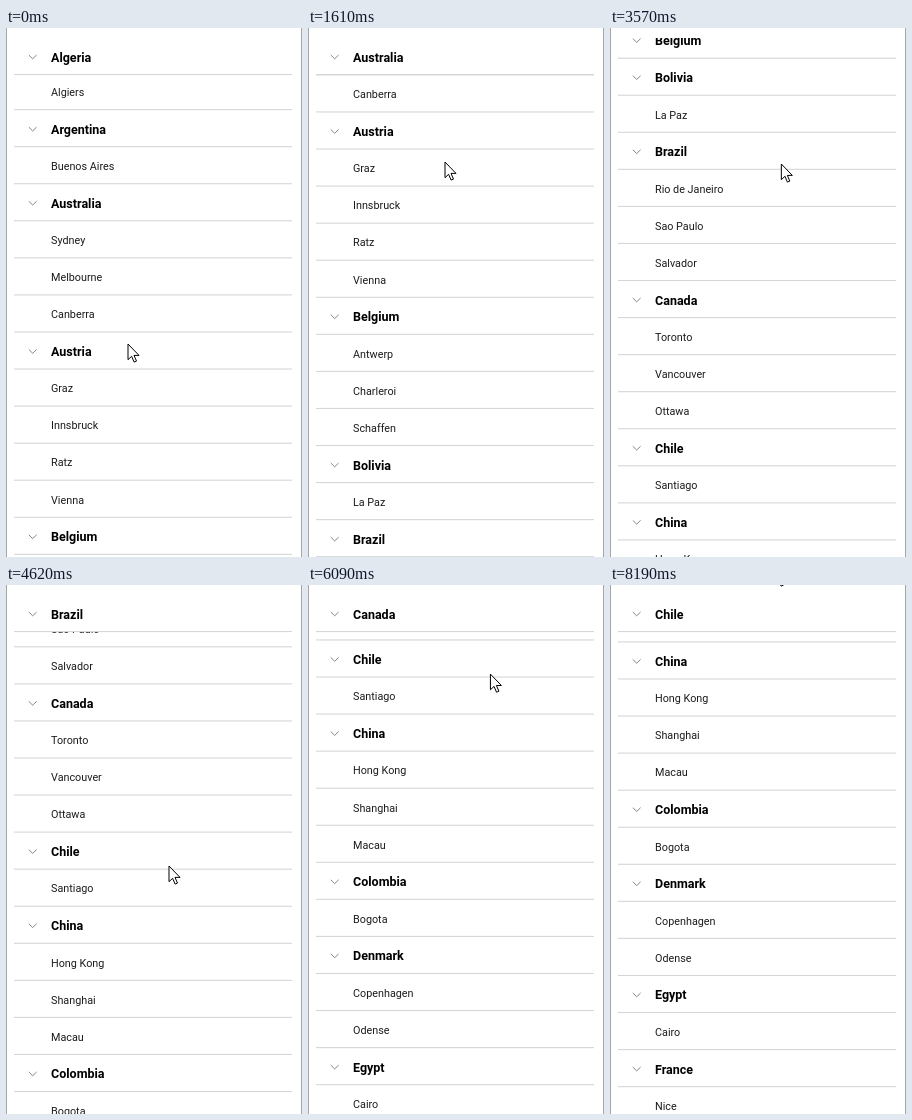
An HTML page with a canvas that plays this animation: 296x529 px, repeating every 8.68 s.

```html
<!DOCTYPE html>
<html lang="en">
<head>
<meta charset="utf-8">
<title>Grouped list</title>
<style>
html, body { margin: 0; width: 100%; height: 100%; overflow: hidden; background: #fff; }
canvas { display: block; width: 296px; height: 529px; }
</style>
</head>
<body>
<canvas id="stage"></canvas>
<script>
const W = 296, H = 529, LOOP = 8680, STEP = 70;
const ROW = 37.06, FIRST = 27, PINNED = 29, LIST_TOP = 10;

const groups = `Algeria:Algiers
Argentina:Buenos Aires
Australia:Sydney,Melbourne,Canberra
Austria:Graz,Innsbruck,Ratz,Vienna
Belgium:Antwerp,Charleroi,Schaffen
Bolivia:La Paz
Brazil:Rio de Janeiro,Sao Paulo,Salvador
Canada:Toronto,Vancouver,Ottawa
Chile:Santiago
China:Hong Kong,Shanghai,Macau
Colombia:Bogota
Denmark:Copenhagen,Odense
Egypt:Cairo
France:Nice`;

const rows = groups.split('\n').flatMap(line => {
  const [country, cities] = line.split(':');
  return [{ text: country, head: true }, ...cities.split(',').map(text => ({ text }))];
});

// time, scroll offset
const scrollKeys = [
  [0, 0], [350, 0], [420, 3], [1610, 220], [2380, 365.8], [2870, 365.8],
  [2940, 374], [3920, 737], [4130, 745], [4410, 745], [4480, 748],
  [4620, 761], [5390, 873], [6720, 1025.3]
];

// time, pointer x, pointer y
const pointerKeys = [
  [0, 122, 316], [280, 104, 373], [350, 104, 373], [1610, 137, 134],
  [2380, 160, 3], [2450, 160, 3], [2730, 171, 328], [2870, 170, 388],
  [3920, 172, 10], [4270, 167, 307], [4340, 169, 315], [4410, 169, 315],
  [4620, 163, 281], [5390, 174, 167], [6720, 190, 19], [6790, 190, 19],
  [7210, 147, 298], [7350, 147, 298], [7420, 147, 299], [7560, 147, 299],
  [7770, 145, 235], [8190, 165, -17]
];

function sample(keys, t, col) {
  const i = keys.findIndex(k => k[0] > t);
  if (i < 0) return keys[keys.length - 1][col];
  const a = keys[i - 1], b = keys[i];
  return a[col] + (b[col] - a[col]) * (t - a[0]) / (b[0] - a[0]);
}

const canvas = document.getElementById('stage');
const ctx = canvas.getContext('2d');
const dpr = window.devicePixelRatio || 1;
canvas.width = W * dpr;
canvas.height = H * dpr;

function drawRow(row, y) {
  ctx.fillStyle = '#d6d6d6';
  ctx.fillRect(8, y + 17, 278, 1.1);
  ctx.fillStyle = row.head ? '#000' : '#1c1c1c';
  ctx.font = row.head ? 'bold 12.5px Roboto, sans-serif' : '10.8px Roboto, sans-serif';
  ctx.fillText(row.text, 45, y + (row.head ? 4.5 : 3.8));
  if (!row.head) return;
  ctx.strokeStyle = '#777';
  ctx.lineWidth = 0.9;
  ctx.beginPath();
  ctx.moveTo(22.8, y - 2);
  ctx.lineTo(26.7, y + 1.8);
  ctx.lineTo(30.6, y - 2);
  ctx.stroke();
}

function drawList(scroll) {
  const center = i => FIRST + i * ROW - scroll;
  ctx.save();
  ctx.beginPath();
  ctx.rect(0, LIST_TOP, W, H);
  ctx.clip();

  let current = 0, next = -1;
  rows.forEach((row, i) => {
    const y = center(i);
    if (y > -ROW && y < H + ROW) drawRow(row, y);
    if (!row.head) return;
    if (y <= PINNED) current = i;
    else if (next < 0) next = i;
  });

  // the following header pushes the pinned one out
  const y = next < 0 ? PINNED : Math.min(PINNED, center(next) - ROW);
  ctx.fillStyle = '#fff';
  ctx.fillRect(1, y - 20, W - 2, 38);
  drawRow(rows[current], y);
  ctx.restore();
}

const arrow = new Path2D('M.5 .5V16.2L4.1 12.8L6.6 18.6L9 17.6L6.5 11.9H11.5Z');

function drawPointer(x, y) {
  ctx.save();
  ctx.translate(x - 0.5, y - 0.5);
  ctx.fillStyle = '#fff';
  ctx.strokeStyle = '#000';
  ctx.lineWidth = 1;
  ctx.fill(arrow);
  ctx.stroke(arrow);
  ctx.restore();
}

function draw(now) {
  const t = Math.floor((now % LOOP) / STEP) * STEP;
  ctx.setTransform(dpr, 0, 0, dpr, 0, 0);
  ctx.fillStyle = '#fff';
  ctx.fillRect(0, 0, W, H);
  drawList(sample(scrollKeys, t, 1));
  ctx.fillStyle = '#a6a6a6';
  ctx.fillRect(0, 0, 1, H);
  ctx.fillRect(W - 1, 0, 1, H);
  drawPointer(sample(pointerKeys, t, 1), sample(pointerKeys, t, 2));
}

const start = performance.now();
function tick() {
  draw(performance.now() - start);
  requestAnimationFrame(tick);
}
tick();
</script>
</body>
</html>
```
